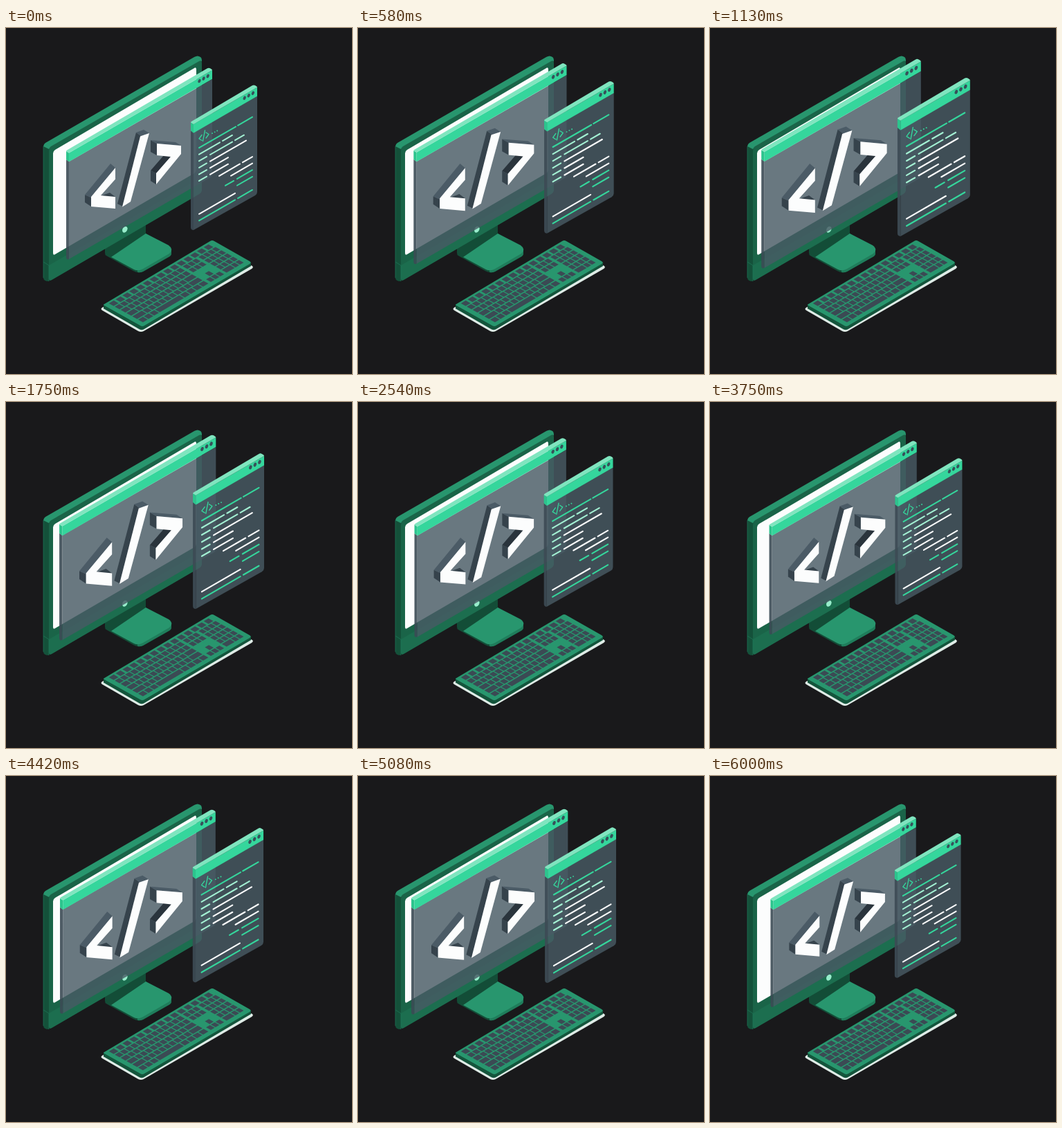
Write an HTML page that moves like this. It is 500x500 px and loops after 6040 ms.

```html
<!DOCTYPE html>
<html lang="en">
<head>
<meta charset="utf-8">
<title>Isometric code workstation</title>
<style>
  html, body { margin: 0; width: 100%; height: 100%; overflow: hidden; background: #19191b; }
  svg { display: block; width: 100vw; height: 100vh; }
</style>
</head>
<body>
<svg viewBox="0 0 500 500">
  <g id="stand">
    <path fill="#134d37" d="M143 317L202 283V297L239 321V326Q239 329 235 331L198 352Q191 355 184 351L145 329Q143 328 143 325Z"/>
    <path fill="#1f7d5b" d="M239 321V326Q239 329 235 331L198 352Q194 354 190 353V346Z"/>
    <path fill="#28966e" d="M152 331L202 297L235 314Q243 320 236 326L198 348Q191 352 185 349Z"/>
  </g>

  <g id="monitor">
    <path fill="#14513a" d="M54 170L62 173V366Q54 366 54 361Z"/>
    <path fill="#28966e" d="M54 171Q54 168 57 166L272 42Q277 39 281 42Q283 43 283 48L62 175Z"/>
    <path fill="#1a6448" d="M62 177Q62 173 65 171L279 48Q283 46 283 50V233Q283 238 279 240L66 364Q62 366 62 362Z"/>
    <path fill="#1c6e4f" d="M62 343L283 215V233Q283 238 279 240L66 364Q62 366 62 362Z"/>
    <path fill="none" stroke="#1f7a59" stroke-width=".7" d="M54 338L62 343V366M54 171V361"/>
    <path fill="#fcfdfd" d="M68 181Q68 178 71 176L272 58Q275 56 275 60V205Q275 208 272 210L71 327Q68 329 68 325Z"/>
    <ellipse cx="171.8" cy="291.2" rx="3.4" ry="4.8" fill="#98edcc" transform="rotate(28 171.8 291.2)"/>
  </g>

  <g id="keyboard">
    <path fill="#dfece7" d="M139 404L298 311L356 344Q358 346 355 348L199 438Q195 440 191 438L139 408Q136 406 139 404Z"/>
    <path fill="#14553c" d="M141 400L354 338V344L199 435.5Q196 437 193 435.5L141 405.5Z"/>
    <path fill="#28966e" d="M142 399L295 308Q298 306 301 308L352 337Q355 339 352 341L200 430Q197 432 194 430L142 401Q140 400 142 399Z"/>
    <g id="keys" fill="#3b4a54" transform="matrix(157 -93 56 31 141 400)"/>
  </g>

  <g id="windows">
    <g id="editor">
      <path fill="#485a64" fill-opacity=".81" d="M91 193L298 74V211Q298 214 295 216L91 334Z"/>
      <path fill="#3b4b55" fill-opacity=".9" d="M87 190L91 193V334Q87 335.5 87 331Z"/>
    </g>
    <g id="symbol">
      <g fill="#36434c">
        <path d="M114 241L123 245V258L114 252Z"/>
        <path d="M136 243L150 238L158 244Z"/>
        <path d="M188 151L195 156L169 258L161 254Z"/>
        <path d="M209 162L218 167V184L209 179Z"/>
        <path d="M209 206L217 210V226L209 221Z"/>
      </g>
      <path fill="#2a343c" d="M209 206L228 184L238 186L217 210Z"/>
      <g fill="#4b5b66">
        <path d="M114 241L151 196L158 202L123 245Z"/>
        <path d="M188 151L199 147L207 152L195 156Z"/>
        <path d="M209 162L245 165L253 170L218 167Z"/>
      </g>
      <g fill="#fcfdfd">
        <path d="M123 244L158 202V218.5L137 242L158 244V261L123 258Z"/>
        <path d="M194 156.5L207 152L180 251L168 258.5Z"/>
        <path d="M218 167L253 170V182L217 226V210L238 186L218 184Z"/>
      </g>
    </g>
    <g id="listing">
      <path fill="#485a64" fill-opacity=".81" d="M271 151L363 98V237Q363 240 360 242L271 292Z"/>
      <path fill="#3d4b55" fill-opacity=".92" d="M267 148L271 151V292Q267 292 267 288Z"/>
      <g fill="none" stroke="#35d69c" stroke-width="1.3" stroke-linecap="round" stroke-linejoin="round">
        <path d="M283 154.5L279 160L283 162.5M287.5 148L284.5 163.5M289 151L293 153.5L289 159"/>
        <path stroke-width="1.8" d="M298 152.2h.1M301.6 150.3h.1M305.2 148.5h.1"/>
      </g>
    </g>
  </g>
</svg>
<script>
const SLOPE = 0.577;
const GREEN = '#35d69c', MINT = '#a3f0d3', WHITE = '#fcfdfd';
const byId = id => document.getElementById(id);

function add(parent, tag, attrs) {
  const node = document.createElementNS('http://www.w3.org/2000/svg', tag);
  for (const name in attrs) node.setAttribute(name, attrs[name]);
  parent.appendChild(node);
}

// Title bar of a window: front, left end, top face and three dots.
function titleBar(parent, x, y, width, dotX) {
  const rise = width * SLOPE, right = x + width, top = y - rise;
  const face = (fill, d) => add(parent, 'path', { fill, d });
  face(GREEN, `M${x} ${y}L${right} ${top}v12.8L${x} ${y + 12.8}Z`);
  face('#2cc48d', `M${x} ${y}l-4 -2.5v12l4 3.3Z`);
  face('#7fe5bf', `M${x} ${y}l-4 -2.4q0 -1 2 -2L${right - 7} ${top - 2.8}q2 -1.2 4 0l2 1.2q1 .6 1 1.6Z`);
  for (let i = 0; i < 3; i++) {
    const cx = dotX + i * 6.1, cy = y + 4.8 - (cx - x) * SLOPE;
    add(parent, 'ellipse', { cx, cy, rx: 1.9, ry: 2.9, fill: '#37505a', transform: `rotate(22 ${cx} ${cy})` });
  }
}

// Each code row lists segments as [from x, to x, colour].
function codeLines() {
  const tick = [279, 290, MINT];
  const rows = [
    [[279, 332, GREEN], [335, 356, GREEN]],
    [[279, 309, MINT], [313, 327, MINT]],
    [tick, [295, 327, MINT], [331, 344, MINT]],
    [tick, [295, 347, WHITE]],
    [tick, [295, 321, WHITE]],
    [tick, [295, 321, WHITE]],
    [[308, 338, WHITE], [342, 356, WHITE]],
    [[325, 356, WHITE]],
    [[317, 329, GREEN], [334, 356, GREEN]],
    [[334, 356, GREEN]],
    [[279, 331, WHITE]],
    [[279, 331, GREEN], [335, 356, GREEN]]
  ];
  rows.forEach((row, i) => row.forEach(([x1, x2, stroke]) => {
    const yAt = x => 173.1 + i * 9.57 - (x - 279) * SLOPE;
    add(byId('listing'), 'line', {
      x1, y1: yAt(x1), x2, y2: yAt(x2), stroke, 'stroke-width': 2, 'stroke-linecap': 'round'
    });
  }));
}

// Each key row lists groups as [start, end, key count] along the keyboard.
function keyCaps() {
  const nav = [.66, .79, 3], pad = [.805, .97, 4];
  const rows = [
    [[.035, .97, 15]],
    [[.035, .645, 13], nav, pad],
    [[.035, .095, 1], [.095, .645, 12], nav, pad],
    [[.035, .11, 1], [.11, .56, 10], [.56, .645, 1], pad],
    [[.035, .13, 1], [.13, .55, 9], [.55, .645, 1], [.703, .747, 1], pad],
    [[.035, .19, 3], [.19, .42, 1], [.42, .645, 4], nav, [.805, .8875, 1], [.8875, .97, 2]]
  ];
  rows.forEach((row, i) => row.forEach(([start, end, count]) => {
    const step = (end - start) / count, gap = i ? .008 : .018;
    for (let k = 0; k < count; k++) add(byId('keys'), 'rect', {
      x: start + k * step, y: .04 + i * .151, width: step - gap, height: .123
    });
  }));
}

titleBar(byId('editor'), 91, 180.5, 207, 279.5);
titleBar(byId('listing'), 271, 138.9, 92, 344.7);
codeLines();
keyCaps();

const FRAMES = 145, STEP = 1000 / 24, LOOP = 6040;
const STOPS = [[0, 1], [.2, 1.1], [.6, 1], [.8, 1.1], [1, 1]];
const REST = 1.0034; // scale at which the windows are drawn

function scaleAt(phase) {
  const i = Math.max(1, STOPS.findIndex(([p]) => phase <= p));
  const [p0, s0] = STOPS[i - 1], [p1, s1] = STOPS[i];
  return s0 + (s1 - s0) * (phase - p0) / (p1 - p0);
}

function render(ms) {
  const frame = Math.min(FRAMES - 1, Math.floor((ms % LOOP + 5) / STEP));
  const scale = scaleAt((frame + 1) / FRAMES) / REST;
  byId('windows').setAttribute('transform', `translate(224.7 195.5) scale(${scale}) translate(-224.7 -195.5)`);
}

const begin = performance.now();
function tick() {
  render(performance.now() - begin);
  requestAnimationFrame(tick);
}
tick();
</script>
</body>
</html>
```
